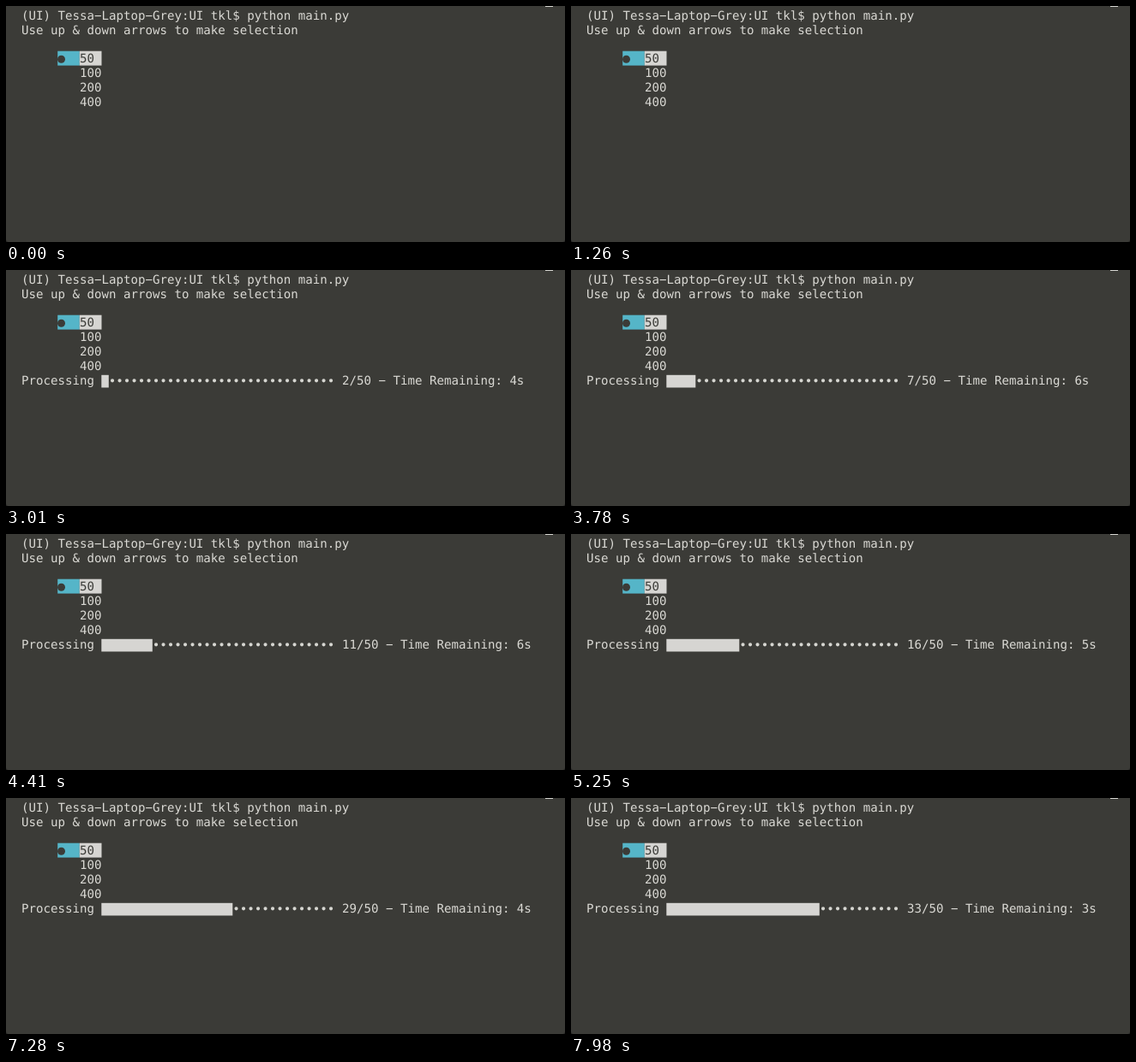
These frames come from a looping animation (652 px wide and 276 px high, 8000 ms). An HTML page:

```html
<!DOCTYPE html>
<html lang="en">
<head>
<meta charset="utf-8">
<title>Terminal progress</title>
<style>
  html, body { margin: 0; width: 100%; height: 100%; overflow: hidden; background: #20201e; }
  svg { display: block; width: 652px; height: 276px; background: #3b3b37; border-radius: 0 0 3px 3px; }
  text {
    font: 14.12px "DejaVu Sans Mono", monospace;
    text-rendering: geometricPrecision;
    white-space: pre;
    fill: #dad9d4;
  }
  .light { fill: #d6d5d2; }
  .dark { fill: #3b3b37; }
  .dots { stroke: #d6d6d1; stroke-width: 4.2; stroke-linecap: round; stroke-dasharray: 0 8.5; }
</style>
</head>
<body>
<svg viewBox="0 0 652 276">
  <rect x="629" y="0" width="9" height="1" fill="#d6d6d1"/>
  <text x="18" y="16">(UI) Tessa−Laptop−Grey:UI tkl$ python main.py</text>
  <text x="18" y="33">Use up &amp; down arrows to make selection</text>

  <rect x="60.2" y="52.7" width="25.6" height="16.9" fill="#55b5c8"/>
  <rect class="light" x="85.8" y="52.7" width="25.7" height="16.9"/>
  <circle class="dark" cx="64.5" cy="62.3" r="4.5"/>
  <text class="dark" x="86" y="66">50</text>
  <text x="86" y="83">100</text>
  <text x="86" y="100">200</text>
  <text x="86" y="117">400</text>

  <g id="progress" visibility="hidden">
    <text x="18" y="134">Processing</text>
    <path id="dots" class="dots"/>
    <rect id="bar" class="light" x="111.3" y="122.8" height="14.7"/>
    <text id="status" x="392" y="134"></text>
  </g>
</svg>
<script>
  const LOOP = 8000, TICK = 70, START = 2800, ITEM = 160;
  const TOTAL = 50, CELLS = 32, CELL = 8.5, BAR_X = 111.3;
  const [progress, dots, bar, status] =
    ["progress", "dots", "bar", "status"].map(id => document.getElementById(id));

  // Moving average of seconds per item; it pauses between items 10 and 17.
  function secondsLeft(count) {
    const filled = count < 17 ? Math.min(count, 10) : Infinity;
    const average = ITEM / 1000 * (1 - 1 / filled);
    return Math.max(1, Math.ceil(average * (TOTAL - count)));
  }

  function draw(time) {
    const shown = Math.floor(time % LOOP / TICK) * TICK;
    const count = Math.floor((shown - START) / ITEM) + 1;
    progress.setAttribute("visibility", count > 0 ? "visible" : "hidden");
    if (count < 1) return;
    const full = Math.floor(count / TOTAL * CELLS);
    const firstDot = BAR_X + (full + 0.5) * CELL;
    const lastDot = BAR_X + (CELLS - 0.5) * CELL;
    bar.setAttribute("width", full * CELL);
    dots.setAttribute("d", `M${firstDot} 129.3H${lastDot + 0.1}`);
    status.textContent = `${count}/${TOTAL} − Time Remaining: ${secondsLeft(count)}s`;
  }

  const begin = performance.now();
  function frame() {
    draw(performance.now() - begin);
    requestAnimationFrame(frame);
  }
  frame();
</script>
</body>
</html>
```
